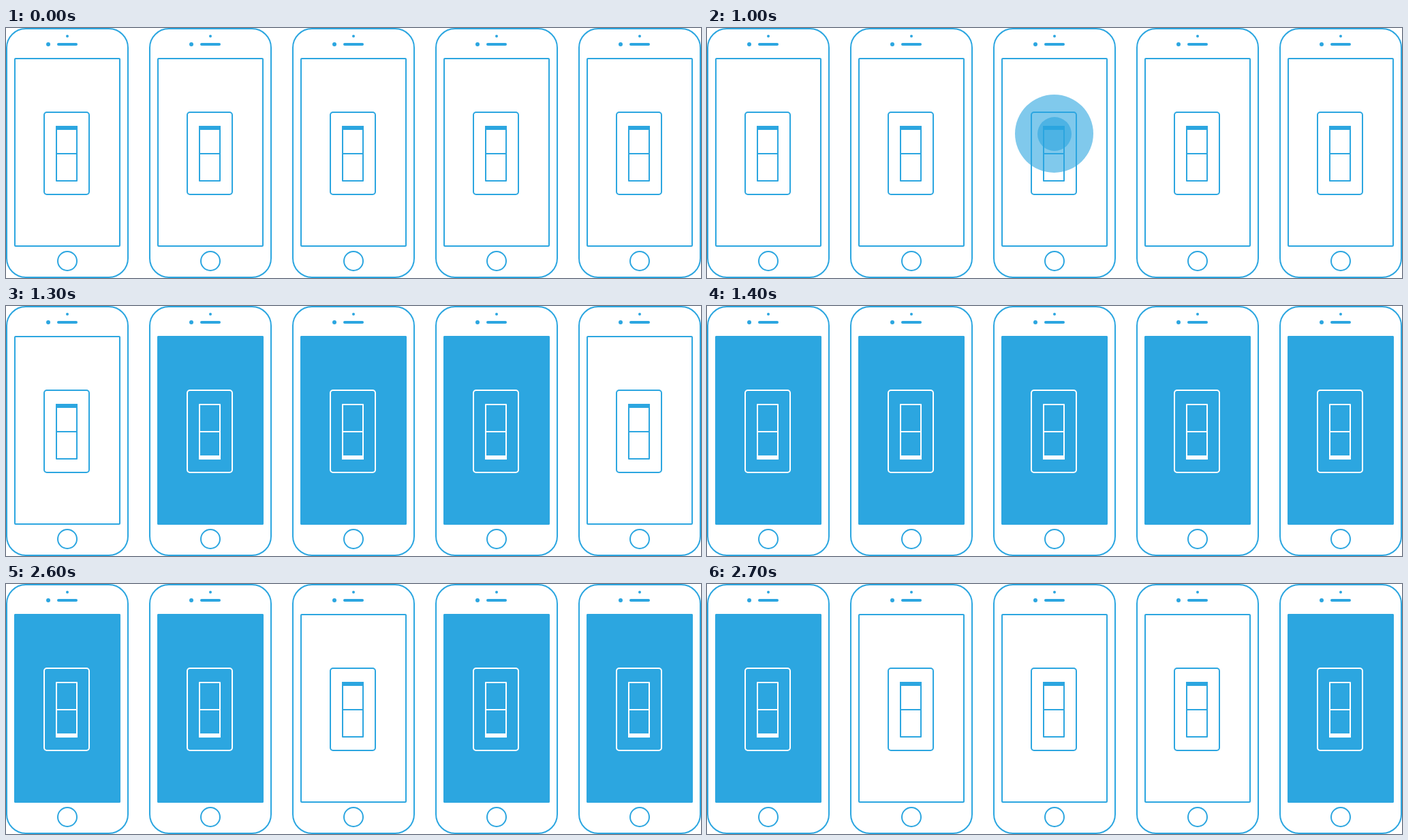
These frames come from a looping animation (1020 by 368 pixels, 2800 ms). An HTML page:

```html
<!DOCTYPE html>
<html lang="en">
<head>
<meta charset="utf-8">
<title>Synchronised light switches</title>
<style>
  html, body { margin: 0; height: 100%; overflow: hidden; background: #fff; }
  svg { display: block; width: 1020px; height: 368px; color: #2ca6e0; }
  .line { fill: none; stroke: currentColor; stroke-width: 2; }
  .fill { fill: currentColor; }
  .white { color: #fff; }
  .touch { fill: currentColor; fill-opacity: .6; }

  /* Each screen is lit for half the loop; --step is the distance from the middle phone. */
  .lit {
    animation: lit 2800ms step-end infinite;
    animation-delay: calc(-1600ms + var(--step) * 100ms);
  }
  @keyframes lit { 0% { opacity: 1 } 50%, 100% { opacity: 0 } }

  .touch { animation: tap 2800ms step-end infinite; }
  .on { animation-delay: -1800ms; }
  .off { animation-delay: -400ms; }
  @keyframes tap { 0% { opacity: 1 } 7.142857%, 100% { opacity: 0 } }
</style>
</head>
<body>
<svg viewBox="0 0 1020 368">
  <defs>
    <g id="switch">
      <rect class="line" x="56" y="124" width="66" height="121" rx="4"/>
      <path class="line" stroke-linejoin="round" d="M74 145h30v80h-30zM74 185h30"/>
    </g>
    <rect id="bar" class="fill" x="73" width="32" height="6" rx=".5"/>
    <g id="phone">
      <rect class="line" x="1" y="1" width="178" height="366" rx="28"/>
      <circle class="fill" cx="90" cy="12" r="2"/>
      <circle class="fill" cx="62" cy="24" r="3"/>
      <rect class="fill" x="75" y="22" width="30" height="4" rx="2"/>
      <circle class="line" cx="90" cy="343" r="14"/>
      <rect class="line" x="13" y="45" width="154" height="276" rx="1"/>
      <use href="#switch"/>
      <use href="#bar" y="144"/>
    </g>
    <g id="lit">
      <rect class="fill" x="12" y="44" width="156" height="278" rx="2"/>
      <g class="white">
        <use href="#switch"/>
        <use href="#bar" y="220"/>
      </g>
    </g>
    <g id="finger">
      <circle cx="509.5" cy="155.5" r="57.5"/>
      <circle cx="510" cy="156" r="25"/>
    </g>
  </defs>

  <use href="#phone"/>
  <use href="#phone" x="210"/>
  <use href="#phone" x="420"/>
  <use href="#phone" x="630"/>
  <use href="#phone" x="840"/>

  <use class="lit" style="--step: 2" href="#lit"/>
  <use class="lit" style="--step: 1" href="#lit" x="210"/>
  <use class="lit" style="--step: 0" href="#lit" x="420"/>
  <use class="lit" style="--step: 1" href="#lit" x="630"/>
  <use class="lit" style="--step: 2" href="#lit" x="840"/>

  <use class="touch on" href="#finger"/>
  <use class="touch off white" href="#finger" y="58"/>
</svg>
</body>
</html>
```
